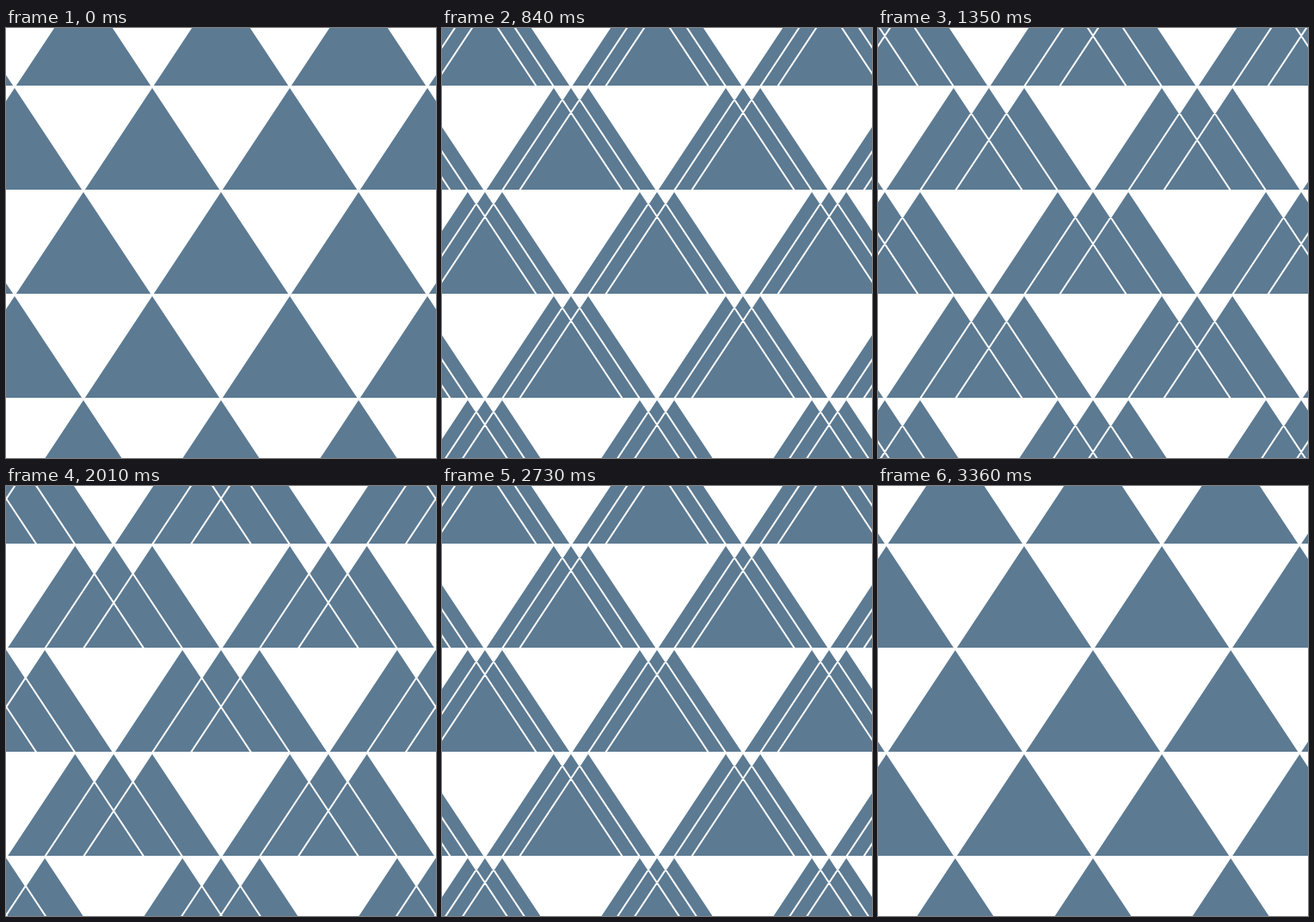
Recreate the animation shown at these times as an HTML page with a canvas. Size 500x500 px, loop 3600 ms.

```html
<!DOCTYPE html>
<html lang="en">
<head>
<meta charset="utf-8">
<title>Splitting triangles</title>
<style>
  html, body { margin: 0; width: 100%; height: 100%; overflow: hidden; background: #fff; }
  canvas { display: block; width: 500px; height: 500px; }
</style>
</head>
<body>
<canvas id="stage" width="500" height="500"></canvas>
<script>
const ctx = document.getElementById('stage').getContext('2d');
const SIZE = 500, MID = 250;
const HALF = 80, ROW = 121, TOP = 68;
const MAX_SPREAD = 45;
const STEP = 30, STEPS = 120;
const EASE_START = 5.75, EASE_LENGTH = 48;

const smooth = p => p * p * (3 - 2 * p);
const clamp = p => Math.min(1, Math.max(0, p));

// Distance between the three copies; the second half mirrors the first.
function spreadAt(ms) {
  const step = Math.floor((ms + 0.01) / STEP) % STEPS;
  const i = Math.min(step, STEPS - 1 - step);
  return MAX_SPREAD * smooth(clamp((i - EASE_START) / EASE_LENGTH));
}

function addTriangle(path, x, y) {
  path.moveTo(x, y);
  path.lineTo(x + HALF, y + ROW);
  path.lineTo(x - HALF, y + ROW);
  path.closePath();
}

function draw(spread) {
  const path = new Path2D();
  const half = HALF + spread;
  for (let row = -1; row <= 3; row++) {
    const odd = Math.abs(row) % 2;
    for (let col = -3; col <= 3; col++) {
      const x = MID + (2 * col + (odd ? 0 : 1)) * half;
      for (const side of [-1, 0, 1]) {
        addTriangle(path, x + side * spread, TOP + row * ROW);
      }
    }
  }
  ctx.fillStyle = '#fff';
  ctx.fillRect(0, 0, SIZE, SIZE);
  ctx.fillStyle = '#5c7a92';
  ctx.fill(path);
  ctx.strokeStyle = '#fff';
  ctx.lineWidth = 2;
  ctx.lineJoin = 'round';
  ctx.stroke(path);
}

function tick(now) {
  draw(spreadAt(now));
  requestAnimationFrame(tick);
}

draw(0);
requestAnimationFrame(tick);
</script>
</body>
</html>
```
